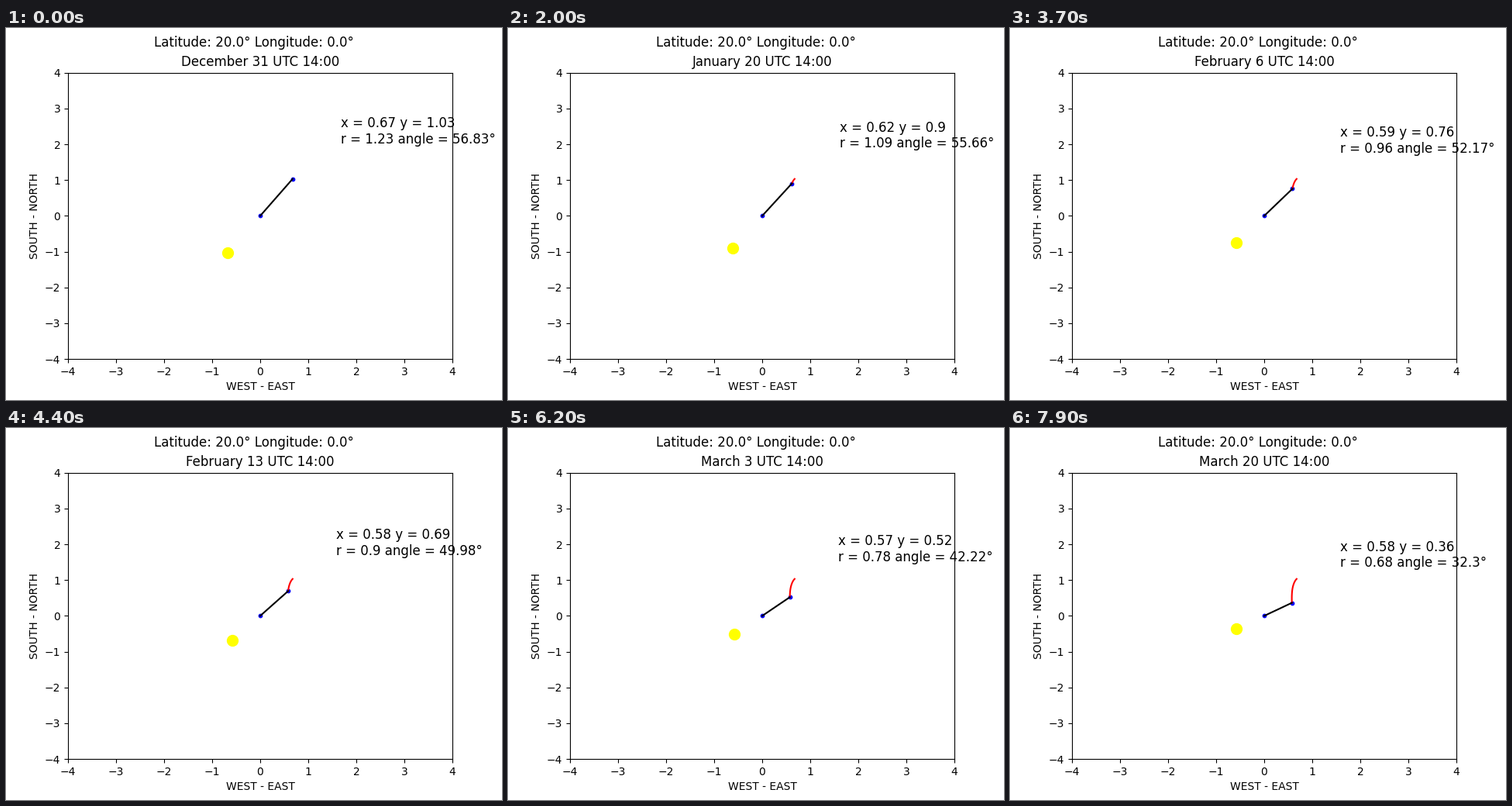
Animation, 640 px wide and 480 px high, one loop 8 s. Source, as a matplotlib script:

```python
import numpy as np
import matplotlib.pyplot as plt
from matplotlib.animation import FuncAnimation

DAYS = 80
MONTHS = [("December", 31), ("January", 31), ("February", 28), ("March", 31)]

# Shadow direction in degrees, a smooth curve through a few known days
KEY_DAYS = np.array([0, 13, 26, 37, 52, 62, 79])
KEY_ANGLES = [56.83, 56.4, 54.71, 52.17, 46.9, 42.22, 32.3]
ANGLE_CURVE = np.polyfit(KEY_DAYS / 40 - 1, KEY_ANGLES, 6)


def shadow_angle(day):
    return np.polyval(ANGLE_CURVE, day / 40 - 1)


def shadow_length(day):
    u = day - 31
    return 1.00705 - 0.008 * u + 6.5e-7 * u**3 - 2.5e-9 * u**4


def date_label(day):
    number = 31 + day
    for month, length in MONTHS:
        if number <= length:
            return f"{month} {number} UTC 14:00"
        number -= length


days = np.arange(DAYS)
angle = shadow_angle(days)
length = shadow_length(days)
xs = length * np.cos(np.radians(angle))
ys = length * np.sin(np.radians(angle))

fig, ax = plt.subplots(figsize=(6.4, 4.8), dpi=100)
fig.suptitle("Latitude: 20.0° Longitude: 0.0°", fontsize=12)
ax.set(xlim=(-4, 4), ylim=(-4, 4), xlabel="WEST - EAST", ylabel="SOUTH - NORTH")
title = ax.set_title("", fontsize=12)

sun = ax.scatter([0], [0], s=100, color="yellow")
ends = ax.scatter([0, 0], [0, 0], s=10, color="blue")
trail, = ax.plot([], [], color="red", lw=1.5)
shadow, = ax.plot([], [], color="black", lw=1.5)
readout = ax.text(0, 0, "", fontsize=12)


def update(day):
    x, y = xs[day], ys[day]
    title.set_text(date_label(day))
    sun.set_offsets([[-x, -y]])
    ends.set_offsets([[0, 0], [x, y]])
    trail.set_data(xs[:day + 1], ys[:day + 1])
    shadow.set_data([0, x], [0, y])
    readout.set_position((x + 1, y + 1))
    readout.set_text(
        f"x = {round(float(x), 2)} y = {round(float(y), 2)}\n"
        f"r = {round(float(length[day]), 2)} angle = {round(float(angle[day]), 2)}°"
    )
    return title, sun, ends, trail, shadow, readout


anim = FuncAnimation(fig, update, frames=DAYS, interval=100, repeat=True, repeat_delay=0)
plt.show()
```
